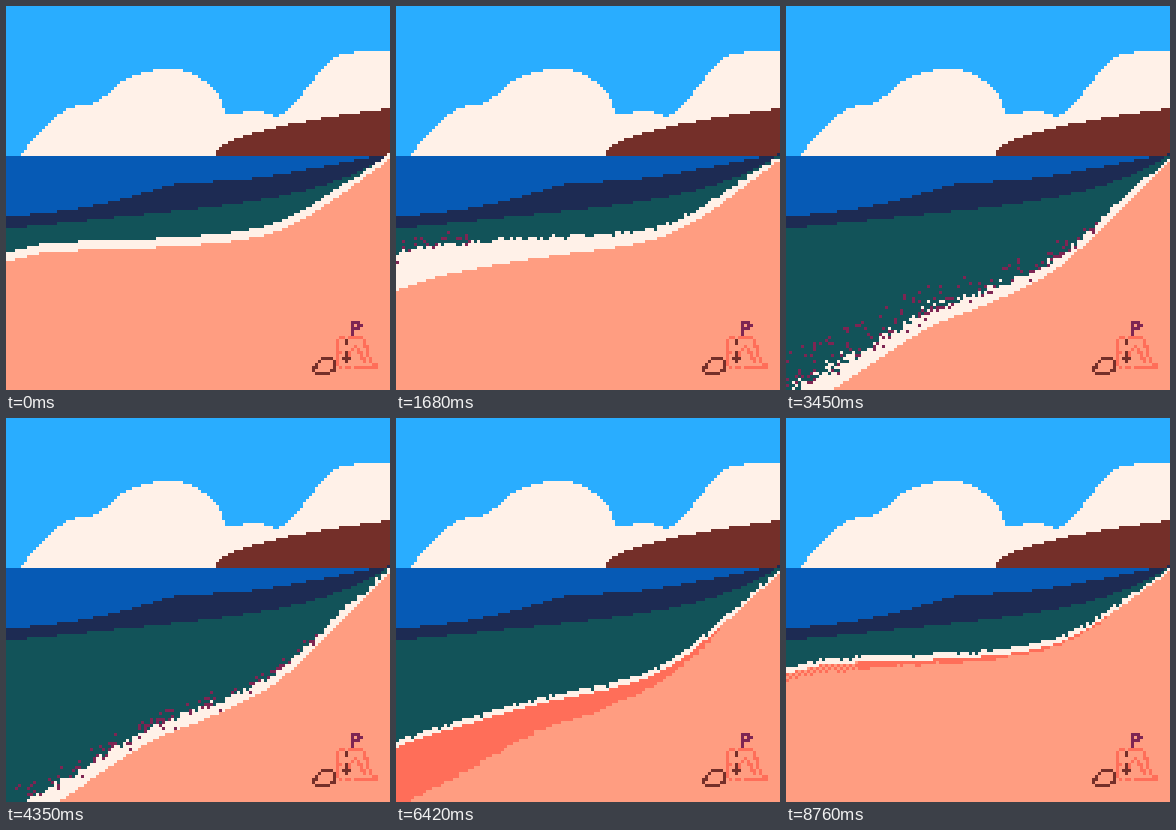
Recreate the animation shown at these times as an HTML page with a canvas. Size 384 by 384 pixels, loop 8790 ms.

```html
<!DOCTYPE html>
<html>
<head>
<meta charset="utf-8">
<style>
html, body { margin: 0; height: 100%; overflow: hidden; background: #ff9d81; }
canvas { display: block; width: 100vw; height: 100vh; image-rendering: pixelated; }
</style>
</head>
<body>
<canvas id="stage" width="128" height="128"></canvas>
<script>
const g = document.getElementById('stage').getContext('2d');
const SIZE = 128, LOOP = 8790, STEP = 30, PEAK = 4350, DRY_LAG = 1050;
const SKY = '#29adff', FOAM = '#fff1e8', LAND = '#742f29', BLUE = '#065ab5', NAVY = '#1d2b53',
  TEAL = '#125359', SAND = '#ff9d81', WET = '#ff6e59', PLUM = '#7e2553';

// Smooth curve through a few x, y points
function curve(...p) {
  const last = p.length - 2;
  const slope = i => {
    const a = Math.max(0, i - 2), b = Math.min(last, i + 2);
    return (p[b + 1] - p[a + 1]) / (p[b] - p[a]);
  };
  return x => {
    let i = 0;
    while (i < last - 2 && x >= p[i + 2]) i += 2;
    const w = p[i + 2] - p[i], f = (x - p[i]) / w;
    return p[i + 1] + (p[i + 3] - p[i + 1]) * f * f * (3 - 2 * f)
      + w * f * (1 - f) * (slope(i) * (1 - f) - slope(i + 2) * f);
  };
}
const cloud = curve(5, 49.5, 20, 35, 29, 33.2, 42, 24, 59, 22, 70, 29, 74, 36.5,
  83, 35, 92, 36.5, 108, 19, 116, 16, 128, 16);
const land = x => 50 - 15.4 * Math.sqrt((x - 70) / 58);
const navyTop = curve(0, 71, 25, 67.8, 43, 63.7, 56, 60, 82, 58, 128, 49.8);
const tealTop = x => 74.7 - 13 * (x / SIZE) - 11.7 * (x / SIZE) ** 6;
const lowTide = curve(0, 85.6, 14, 82.6, 56, 80.6, 83, 77.6, 100, 71, 128, 51.6);
const highTide = curve(0, 139, 18, 128, 47, 109, 70, 99.3, 90, 88.7, 110, 70, 128, 52);

const ramp = (t, a, b) => Math.min(1, Math.max(0, (t - a) / (b - a)));
const pulse = (t, a, b, c) => Math.min(ramp(t, a, b), 1 - ramp(t, b, c));

function noise(x, y) {
  const v = Math.sin(x * 127.1 + y * 311.7 + 4.3) * 43758.5453;
  return v - Math.floor(v);
}

// The wave rushes in, then slides back slowly
function tide(t) {
  return t < PEAK ? 1 / (1 + Math.exp((2187 - t) / 334))
    : .5 + .5 * Math.cos(Math.PI * ramp(t, PEAK, PEAK + 3950));
}
function shore(x, t) {
  const u = x / SIZE, k = tide(t), mid = k * (1 - k);
  const bend = t < PEAK ? -.6 * mid * Math.sin(Math.PI * u ** 1.5) : 5 * u ** 1.5 * mid * mid;
  return lowTide(x) + (highTide(x) - lowTide(x)) * (k + bend);
}
function thickness(x, t) {
  const ebb = ramp(t, PEAK, 5370);
  const swell = 9.5 * ramp(t, 0, 1680) * (1 - .57 * ramp(t, 1680, 3500)) * (1 - ebb);
  return (3 - 1.1 * ebb + swell * (1 - x / SIZE) ** 2) * Math.min(1, .5 + (SIZE - x) / 40);
}

function below(x, y, color) {
  y = Math.floor(y);
  g.fillStyle = color;
  g.fillRect(x, y, 1, SIZE - y);
}
function dot(x, y, color) {
  g.fillStyle = color;
  g.fillRect(x, y, 1, 1);
}
function sprite(x, y, rows, color) {
  rows.forEach((row, j) => [...row].forEach((c, i) => c === '#' && dot(x + i, y + j, color)));
}

function drawToys() {
  sprite(110, 110, [
    ' ## #####',
    '#  #     #',
    '#        #',
    '#     #  ##',
    '#    # #  #',
    '## ##  ## #',
    '#   #   # #',
    '#  #    ## #',
    '#        # #',
    '#           ##',
    ' # ## ########'], WET);
  sprite(112, 111, [' #', ' #', '', '', ' #', ' #', '###', ' #'], LAND);
  sprite(102, 117, ['   ####', '  #    #', ' #     #', '##     #', '#     ##', ' #####'], LAND);
  sprite(115, 105, ['###', '# ##', '###', '#', '#'], PLUM);
}

// Foam left in the water breaks into specks, bright near the edge
function drawSpray(x, edge, t) {
  const taper = 1 - .007 * x;
  const white = 9 * taper * pulse(t, 1700, 2610, PEAK);
  const plum = 22 * taper * pulse(t, 1400, 2610, 5100);
  if (plum < .5 || x > 104 * ramp(t, 1400, 2610)) return;
  for (let y = Math.ceil(edge - plum); y < edge + 3; y++) {
    const s = edge - y;
    if (s > 0 && s < white && noise(x, y) < .26) dot(x, y, FOAM);
    else if (noise(y + 9, x) < (s < 0 ? .04 : s < 4 ? .18 : .1)) dot(x, y, PLUM);
  }
}

function drawColumn(x, t) {
  const c = x + .5;
  below(x, 0, SKY);
  if (x >= 5) below(x, cloud(c), FOAM);
  if (x >= 70) below(x, land(c), LAND);
  below(x, 50, BLUE);
  below(x, navyTop(c), NAVY);
  below(x, tealTop(c), TEAL);

  const wash = Math.floor(shore(c, t));
  const rough = 1.8 * ramp(t, 0, 2610) - .6 * ramp(t, PEAK, 5370);
  const jag = (noise(x, Math.floor(t / 120)) - .5) * rough;
  const edge = Math.round(wash - thickness(c, t) + jag);
  below(x, edge, FOAM);
  below(x, wash, SAND);

  if (t > PEAK && x < 108) {
    const end = Math.min(SIZE, shore(c, t - DRY_LAG) + noise(x, 77) - .5);
    const dried = 24 * ramp(t, 8550, 8760);
    for (let y = wash; y < Math.floor(end); y++)
      if (x >= dried || (x + y) % 2) dot(x, y, WET);
  }
  drawSpray(x, edge, t);
}

function frame(now) {
  const t = Math.floor(now % LOOP / STEP) * STEP;
  for (let x = 0; x < SIZE; x++) drawColumn(x, t);
  drawToys();
  requestAnimationFrame(frame);
}
frame(performance.now());
</script>
</body>
</html>
```
